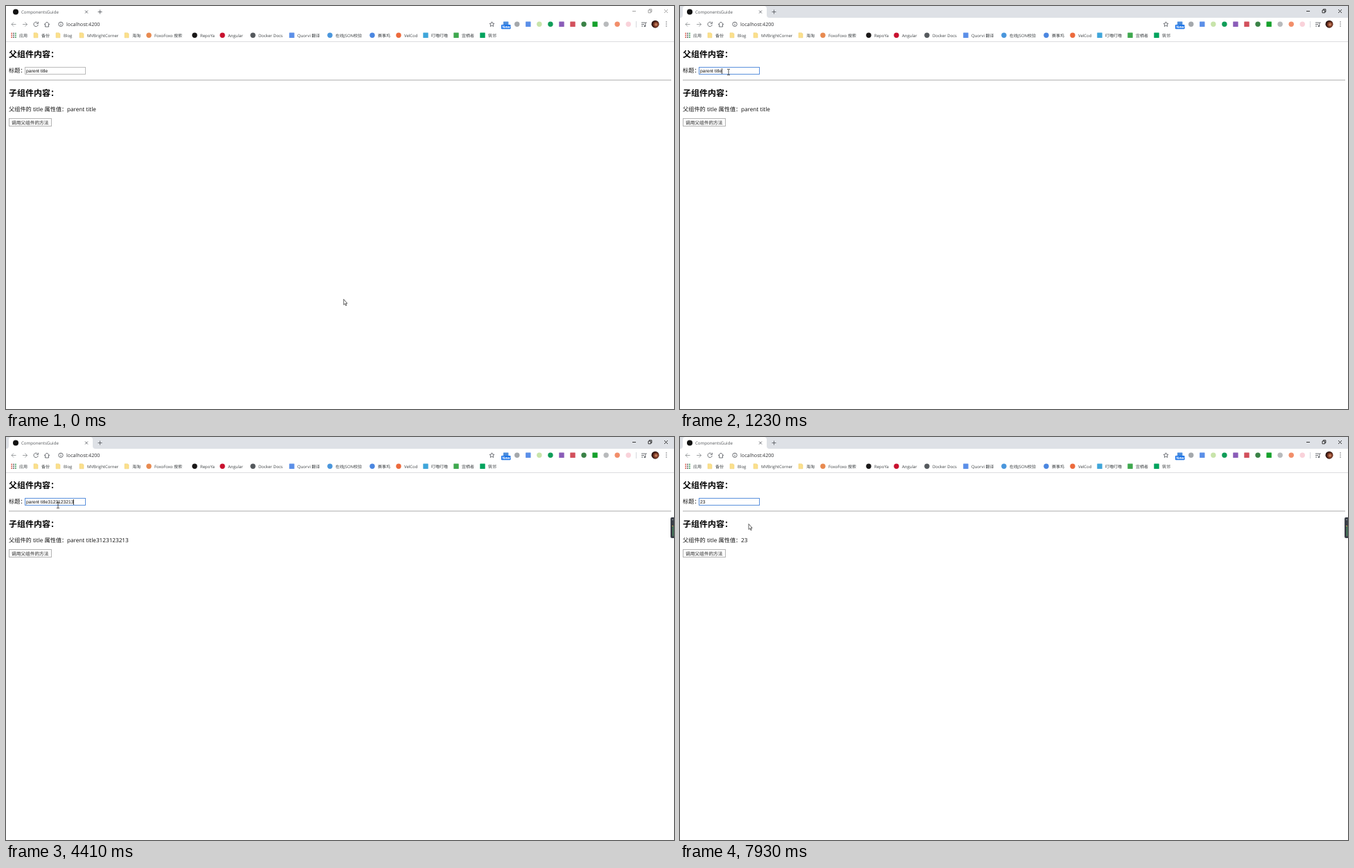
Recreate the animation shown at these times as an HTML page. Size 963 px wide and 582 px high, loop 8 s.

```html
<!DOCTYPE html>
<html lang="zh-CN">
<head>
<meta charset="utf-8">
<title>ComponentsGuide</title>
<style>
html, body { margin: 0; width: 100%; height: 100%; overflow: hidden; background: #fff; }
svg { display: block; width: 963px; height: 582px; }
text { font-family: "Open Sans", "Noto Sans CJK SC", "Noto Sans CJK", sans-serif; white-space: pre; text-rendering: geometricPrecision; }
.page { font-size: 8.2px; fill: #111; }
.heading { font-size: 12px; font-weight: 700; fill: #000; }
.mark { font-size: 6px; fill: #3c4043; }
.field { font: 6.7px "Liberation Sans", Arial, sans-serif; fill: #111; }
.line { fill: none; stroke: #5f6368; stroke-width: .9; }
</style>
</head>
<body>
<svg viewBox="0 0 963 582">
  <defs>
    <radialGradient id="portrait" cx=".6" cy=".55">
      <stop offset="0" stop-color="#d59a74"/><stop offset=".5" stop-color="#8a4029"/><stop offset="1" stop-color="#2a1310"/>
    </radialGradient>
  </defs>
  <rect width="963" height="582" fill="#fff"/>

  <rect id="strip" width="963" height="17" fill="#dee1e6"/>
  <path d="M0 17Q4 17 4 13V4Q4 0 8 0H121Q125 0 125 4V13Q125 17 129 17Z" fill="#fff"/>
  <circle cx="14" cy="8.5" r="4" fill="#111"/>
  <text x="22" y="11" font-size="6.15" fill="#55585c">ComponentsGuide</text>
  <path class="line" d="M114 6.5l4 4m0-4l-4 4M132.5 8.5h6m-3-3v6"/>
  <g id="controls" fill="none" stroke-width=".9">
    <path d="M903 7.5h5M949 5l5 5m0-5l-5 5"/>
    <path d="M926 6h3.6v3.8H926zM927.3 6V4.7h3.6v3.8h-1.3"/>
  </g>

  <path class="line" stroke-opacity=".65" d="M14.5 26.5H8m3-3l-3 3 3 3M24 26.5h6.5m-3-3l3 3-3 3"/>
  <path class="line" d="M45.5 24.2a3.2 3.2 0 1 0 .8 2.8M46.4 22.8v2.6h-2.6"/>
  <path class="line" d="M55 26.8l4-3.8 4 3.8M56.5 26v4h5v-4"/>
  <circle class="line" cx="79" cy="26.3" r="3.2"/>
  <path class="line" d="M79 25.8v2.3M79 24.3v.8"/>
  <text x="87" y="28.7" font-size="7.2" fill="#303134">localhost:4200</text>
  <path class="line" d="M700.5 22.8l1 2.3 2.5.2-1.9 1.7.6 2.5-2.2-1.3-2.2 1.3.6-2.5-1.9-1.7 2.5-.2z"/>
  <g id="extensions"></g>
  <rect x="714" y="27" width="13.5" height="6.3" rx="1" fill="#1a73e8"/>
  <text x="715.2" y="32.1" font-size="5.2" font-weight="700" fill="#fff">New</text>
  <path d="M908.5 22v9" stroke="#d5d8dc"/>
  <path class="line" d="M916 24h5.5M916 26.5h4M916 29h2.5M921.8 29v-5h2"/>
  <circle cx="921" cy="29" r="1.2" fill="#5f6368"/>
  <circle cx="936" cy="26.2" r="5.5" fill="url(#portrait)"/>
  <path d="M952 23v7" stroke="#5f6368" stroke-width="1.5" stroke-linecap="round" stroke-dasharray="0 3"/>
  <g id="bookmarks"></g>
  <path d="M0 51.5h963" stroke="#dcdddf"/>

  <text class="heading" x="4" y="74.3">父组件内容：</text>
  <text class="page" x="4" y="96">标题：</text>
  <rect id="box" x="27.5" y="88.5" width="87" height="10" fill="#fff"/>
  <text id="field" class="field" x="29" y="95.9"></text>
  <rect id="caret" y="90" width="1" height="8" fill="#444"/>
  <path d="M4 107h955" stroke="#aaa"/>
  <text class="heading" x="4" y="130.3">子组件内容：</text>
  <text class="page" x="4" y="152">父组件的 title 属性值：</text>
  <text id="echo" class="page" x="88" y="152"></text>
  <rect x="4.5" y="162.5" width="61" height="11" fill="#fcfcfc" stroke="#b4b4b4"/>
  <text x="8" y="170.5" font-size="6.7" fill="#222">调用父组件的方法</text>

  <g id="meter">
    <path d="M963 116h-3q-2 0-2 2v26q0 2 2 2h3z" fill="#3b4048"/>
    <path d="M961.5 128v15" stroke="#4ea567"/>
    <path d="M960 119.5h2" stroke="#9aa0a6"/>
    <rect id="level" x="960" y="128" width="2" height="1" fill="#d8a24a"/>
  </g>
  <path id="arrow" d="M0 0V8L1.8 6.4 3 9.2 4.2 8.7 3 5.9H5.1Z" fill="#fff" stroke="#222" stroke-width=".7"/>
  <path id="beam" d="M-2-4.2h1.5L0-3.8.5-4.2H2M0-3.8v7.6M-2 4.2h1.5L0 3.8l.5.4H2" fill="none" stroke="#222" stroke-width=".8"/>
</svg>
<script>
const LOOP = 8000, STEP = 77, FOCUS = 1230, METER = 1310;
const $ = id => document.getElementById(id);

function add(parent, tag, attrs, text = '') {
  const el = document.createElementNS('http://www.w3.org/2000/svg', tag);
  for (const key in attrs) el.setAttribute(key, attrs[key]);
  el.textContent = text;
  parent.append(el);
}

function icon(parent, kind, x, y, fill) {
  if (kind === 'dot') add(parent, 'circle', { cx: x, cy: y, r: 3.7, fill });
  else if (kind === 'square') add(parent, 'rect', { x: x - 3.7, y: y - 3.7, width: 7.4, height: 7.4, rx: .5, fill });
  else if (kind === 'folder') add(parent, 'path', { d: `M${x - 3} ${y - 3.5}h4.5v1h1.5v6h-6z`, fill, stroke: '#edcf72', 'stroke-width': .5 });
  else for (let i = 0; i < 9; i++)
    add(parent, 'rect', { x: x - 3.6 + i % 3 * 2.8, y: y - 3.6 + Math.floor(i / 3) * 2.8, width: 1.7, height: 1.7, fill: ['#d65345', '#5f6368', '#3f9b5c'][i % 3] });
}

// label, text x, icon kind, icon colour
const bookmarks = [
  ['应用', 19, 'apps'],
  ['备份', 51, 'folder', '#fbe08c'],
  ['Blog', 83, 'folder', '#fbe08c'],
  ['MVBrightCorner', 117, 'folder', '#fbe08c'],
  ['海淘', 182, 'folder', '#fbe08c'],
  ['FoxoFoxo 搜索', 214, 'dot', '#e88a50'],
  ['RepoYa', 280, 'dot', '#191717'],
  ['Angular', 320, 'dot', '#c8102e'],
  ['Docker Docs', 364, 'dot', '#55595d'],
  ['Quorvi 翻译', 420, 'square', '#5b8fe8'],
  ['在线JSON校验', 475, 'dot', '#4a96dc'],
  ['赛事坞', 536, 'dot', '#4a86e0'],
  ['VelCod', 574, 'dot', '#ec6a3c'],
  ['叮噜叮噜', 613, 'square', '#3fa5da'],
  ['宜栖者', 657, 'square', '#3fa84e'],
  ['筑邻', 695, 'square', '#00a35d']
];
for (const [label, x, kind, fill] of bookmarks) {
  icon($('bookmarks'), kind, x - 8, 42.3, fill);
  add($('bookmarks'), 'text', { class: 'mark', x, y: 44.6 }, label);
}

['#4c8ddd', '#a4a8ac', '#5b8fe8', '#c8e4aa', '#0f9d58', '#8a5cb8', '#d2505c', '#3a8246', '#16a12c', '#b8babc', '#f28e6a', '#f9d2da']
  .forEach((fill, i) => icon($('extensions'), [0, 2, 5, 6, 8].includes(i) ? 'square' : 'dot', 720.7 + i * 16.05, 26.2, fill));

const typed = 'parent title3123123213123';
const first = n => typed.slice(0, n);
const values = [
  [0, 12], [2090, 13], [2330, 15], [2480, 16], [2630, 17], [2710, 18], [2790, 19], [2940, 21], [3020, 22],
  [3170, 24], [3250, 25], [4030, 24], [4260, 23], [4330, 22]
].map(([time, n]) => [time, first(n)]);
for (let i = 0; i < 9; i++) values.push([4960 + i * 77.5, first(Math.round(21 - i * 2.5))]);
values.push([5900, ''], [7380, '23']);

const caretToggles = [FOCUS, 1780, 2090, 3800, 4030, 4810, 4960, 6210, 6440, 7000, 7380, 7930];
const meterToggles = [2170, 3250, 4330, 6440, 7550];

// time, x, y of the pointer's hot spot
const pointer = [
  [0, 486.8, 423.5], [840, 68.5, 107], [1070, 70, 95.5],
  [2630, 70, 95.5], [2790, 75, 98.5],
  [6140, 75, 98.5], [6440, 111, 134.5],
  [6530, 111, 134.5], [6680, 101, 126.5],
  [6780, 101, 126.5], [7000, 99, 125.5], [LOOP, 99, 125.5]
];

const countPast = (times, t) => times.filter(time => time <= t).length;
const ease = p => p * p * (3 - 2 * p);

function pointerAt(t) {
  if (t < 70) return pointer[0].slice(1);
  const held = 70 + Math.floor((t - 69) / STEP) * STEP;
  const next = pointer.findIndex(key => key[0] > held);
  const [t0, x0, y0] = pointer[next - 1], [t1, x1, y1] = pointer[next];
  const p = ease((held - t0) / (t1 - t0));
  return [x0 + (x1 - x0) * p, y0 + (y1 - y0) * p];
}

function show(id, visible) { $(id).style.visibility = visible ? 'visible' : 'hidden'; }

function draw(t) {
  const focused = t >= FOCUS;
  const value = values[countPast(values.map(v => v[0]), t) - 1][1];
  show('strip', focused);
  show('meter', t >= METER);
  show('level', t >= METER && countPast(meterToggles, t) % 2);
  $('controls').setAttribute('stroke', focused ? '#222' : '#999');
  $('box').setAttribute('stroke', focused ? '#5a90dc' : '#bbb');

  $('field').textContent = value;
  $('echo').textContent = value || '父组件的 title 属性值为空';
  const textEnd = 29 + (value ? $('field').getComputedTextLength() : 0);
  $('caret').setAttribute('x', Math.round(textEnd - .1));
  show('caret', countPast(caretToggles, t) % 2);

  const [x, y] = pointerAt(t);
  const overField = x > 28 && x < 115 && y > 88 && y < 100;
  show('arrow', !overField);
  show('beam', overField);
  $(overField ? 'beam' : 'arrow').setAttribute('transform', `translate(${x} ${y})`);
}

const start = performance.now();
function tick() {
  draw((performance.now() - start) % LOOP);
  requestAnimationFrame(tick);
}
tick();
</script>
</body>
</html>
```
